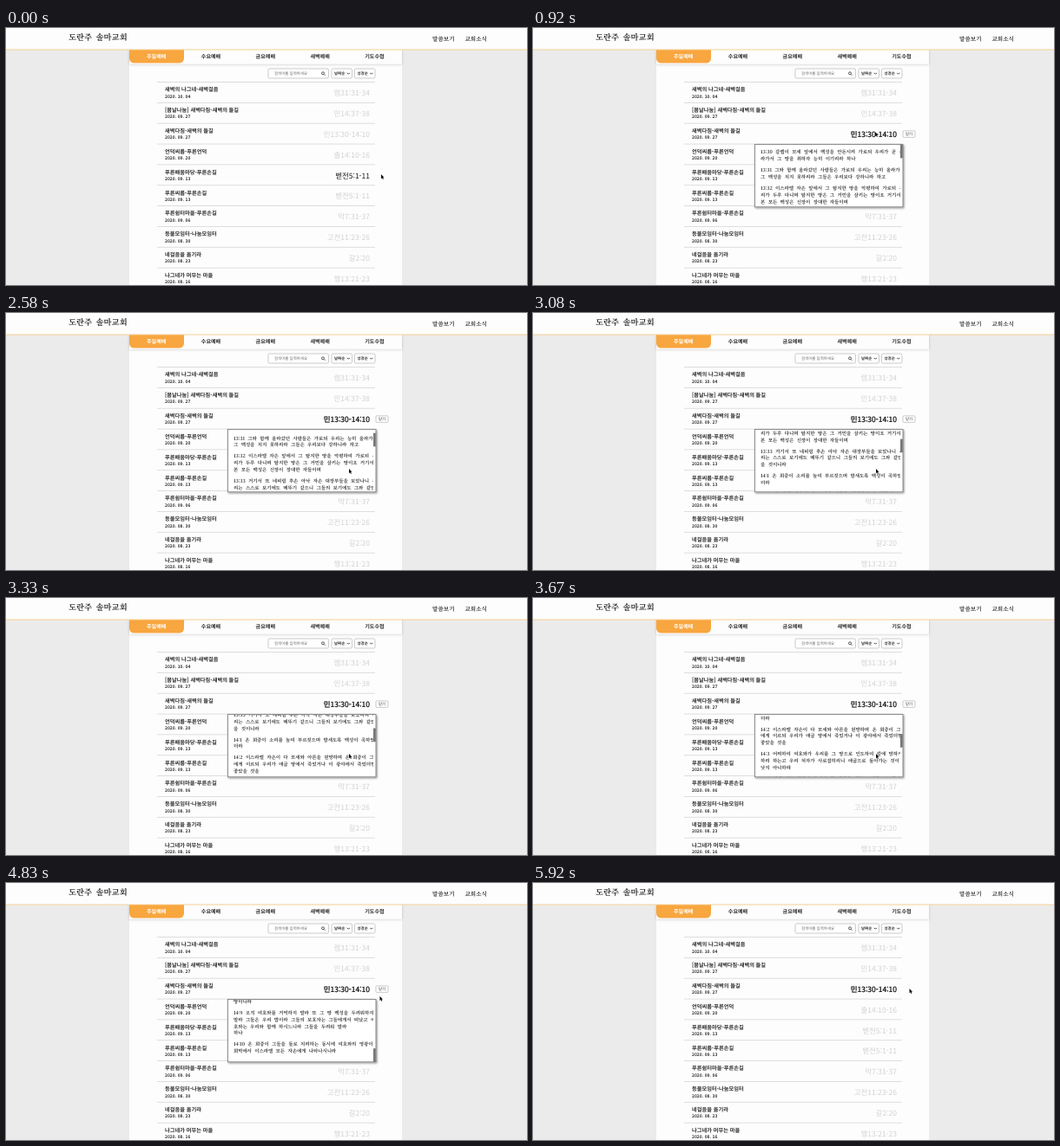
Write an HTML page that moves like this. It is 600 by 297 pixels and loops after 6010 ms.

```html
<!DOCTYPE html>
<html lang="ko">
<head>
<meta charset="utf-8">
<style>
  html, body { margin: 0; width: 100%; height: 100%; overflow: hidden; background: #ebebeb; }
  svg { display: block; width: 600px; height: 297px; }
  text { font-family: 'Noto Sans CJK KR', 'Noto Sans KR', sans-serif; fill: #2e2e2e; white-space: pre; text-rendering: geometricPrecision; }
  .brush { font-family: 'Noto Serif CJK KR', 'Noto Sans CJK KR', serif; font-weight: 600; }
  .mid { text-anchor: middle; }
  .tab { font-size: 6.1px; font-weight: 700; }
  .title { font-size: 6.24px; font-weight: 600; }
  .date { font-size: 4.95px; font-weight: 600; }
  .ref { font-size: 8.5px; font-weight: 500; text-anchor: end; }
  .small { font-size: 4.45px; font-weight: 500; }
  .verse { font-size: 5.55px; letter-spacing: -.15px; word-spacing: 1.9px; }
  .box { fill: #fff; stroke: #aaa; stroke-width: .6; }
  .icon { fill: none; stroke: #333; stroke-width: .8; }
</style>
</head>
<body>
<svg id="stage" viewBox="0 0 600 297"></svg>
<script>
const LOOP = 6010, FRAME = 1000 / 12;
const ROW_TOP = 62.5, ROW_STEP = 23.85, LINE = 7.8, GAP = 5.2;

const rows = [
  ['새벽의 나그네-새벽걸음', '2020. 10. 04', '렘31:31-34'],
  ['[봄날나눔] 새벽다짐-새벽의 들길', '2020. 09. 27', '민14:37-38'],
  ['새벽다짐-새벽의 들길', '2020. 09. 27', '민13:30-14:10'],
  ['언덕씨름-푸른언덕', '2020. 09. 20', '출14:10-16'],
  ['푸른배움마당-푸른손길', '2020. 09. 13', '벧전5:1-11'],
  ['푸른씨름-푸른손길', '2020. 09. 13', '벧전5:1-11'],
  ['푸른쉼터마을-푸른손길', '2020. 09. 06', '막7:31-37'],
  ['등불모임터-나눔모임터', '2020. 08. 30', '고전11:23-26'],
  ['네걸음을 옮기라', '2020. 08. 23', '갈2:20'],
  ['나그네가 머무는 마을', '2020. 08. 16', '행13:21-23']
];

const verses = [
  '13:30 갈렙이 모세 앞에서 백성을 안돈시켜 가로되 우리가 곧 올|라가서 그 땅을 취하자 능히 이기리라 하나',
  '13:31 그와 함께 올라갔던 사람들은 가로되 우리는 능히 올라가서|그 백성을 치지 못하리라 그들은 우리보다 강하니라 하고',
  '13:32 이스라엘 자손 앞에서 그 탐지한 땅을 악평하여 가로되 우|리가 두루 다니며 탐지한 땅은 그 거민을 삼키는 땅이요 거기서|본 모든 백성은 신장이 장대한 자들이며',
  '13:33 거기서 또 네피림 후손 아낙 자손 대장부들을 보았나니 우|리는 스스로 보기에도 메뚜기 같으니 그들의 보기에도 그와 같았|을 것이니라',
  '14:1 온 회중이 소리를 높여 부르짖으며 밤새도록 백성이 곡하였|더라',
  '14:2 이스라엘 자손이 다 모세와 아론을 원망하며 온 회중이 그들|에게 이르되 우리가 애굽 땅에서 죽었거나 이 광야에서 죽었더면|좋았을 것을',
  '14:3 어찌하여 여호와가 우리를 그 땅으로 인도하여 칼에 망하게|하려 하는고 우리 처자가 사로잡히리니 애굽으로 돌아가는 것이|낫지 아니하랴',
  '14:4 이에 서로 말하되 우리가 한 장관을 세우고 애굽으로 돌아|가자 하매',
  '14:5 모세와 아론이 이스라엘 자손의 온 회중 앞에서 엎드린지|라',
  '14:6 그 땅을 탐지한 자 중 눈의 아들 여호수아와 여분네의 아들|갈렙이 그 옷을 찢고',
  '14:7 이스라엘 자손의 온 회중에 일러 가로되 우리가 두루 다니며|탐지한 땅은 심히 아름다운 땅이라',
  '14:8 여호와께서 우리를 기뻐하시면 우리를 그 땅으로 인도하여|들이시고 그 땅을 우리에게 주시리라 이는 과연 젖과 꿀이 흐르는|땅이니라',
  '14:9 오직 여호와를 거역하지 말라 또 그 땅 백성을 두려워하지|말라 그들은 우리 밥이라 그들의 보호자는 그들에게서 떠났고 여|호와는 우리와 함께 하시느니라 그들을 두려워 말라|하나',
  '14:10 온 회중이 그들을 돌로 치려하는 동시에 여호와의 영광이|회막에서 이스라엘 모든 자손에게 나타나시니라'
];

// Keyframes: [time, value...]
const cursorKeys = [[0, 432, 169], [667, 394, 120], [1417, 394, 120], [1750, 395, 180],
  [4450, 395, 180], [4750, 430, 132], [5417, 433.5, 122]];
const scrollKeys = [[2083, 0], [2583, 19.5], [3083, 54], [3667, 111.4], [4250, 223.4], [4583, 282]];
const hoverKeys = {
  2: [[417, 0], [750, 1]],
  3: [[167, 0], [417, .7], [667, 0]],
  4: [[0, .86], [83, .86], [417, 0]]
};

function at(keys, t) {
  if (t <= keys[0][0]) return keys[0].slice(1);
  const i = keys.findIndex(k => k[0] > t);
  if (i < 0) return keys[keys.length - 1].slice(1);
  const a = keys[i - 1], b = keys[i], p = (t - a[0]) / (b[0] - a[0]);
  return a.slice(1).map((v, j) => v + (b[j + 1] - v) * p);
}

const text = (x, y, cls, s, extra = '') => `<text x="${x}" y="${y}" class="${cls}" ${extra}>${s}</text>`;
const rect = (x, y, w, h, extra) => `<rect x="${x}" y="${y}" width="${w}" height="${h}" ${extra}/>`;
const caret = x => `<path class="icon" d="M${x - 1.7} 52.1l1.7 .9l1.7-.9"/>`;

function page() {
  const tabs = ['주일예배', '수요예배', '금요예배', '새벽예배', '기도수첩'];
  return rect(142, 25, 314, 272, 'fill="#fdfdfd"') +
    rect(142, 25, 314, 16.5, 'fill="#fdfdfd" filter="url(#soft)"') +
    '<path d="M142 25h63v9.5q0 6-6 6h-51q-6 0-6-6z" fill="#f8a63f"/>' +
    tabs.map((s, i) => text(173.2 + i * 62.8, 34.6, 'tab mid', s, i ? '' : 'style="fill:#fff"')).join('') +
    rect(0, 0, 600, 25, 'fill="#fdfdfd"') +
    rect(0, 24.5, 600, 1, 'fill="#f9cf94"') +
    text(72, 14.3, 'brush', '도란주 솔마교회', 'font-size="9.4" word-spacing="1.4"') +
    text(503.8, 14.8, 'brush mid', '말씀보기', 'font-size="6.6"') +
    text(541.2, 14.8, 'brush mid', '교회소식', 'font-size="6.6"') +
    rect(302, 47, 69.5, 11, 'rx="1.5" class="box"') +
    text(309, 54.1, 'small', '검색어를 입력하세요', 'style="fill:#666"') +
    '<circle cx="365" cy="52.3" r="1.5" class="icon"/><path d="M366.1 53.4l1.4 1.4" class="icon"/>' +
    rect(375, 47, 23.5, 11, 'rx="1.5" class="box"') + text(378, 54.1, 'small', '날짜순', 'style="font-weight:700"') + caret(394.3) +
    rect(401.5, 47, 23.5, 11, 'rx="1.5" class="box"') + text(404.5, 54.1, 'small', '성경순', 'style="font-weight:700"') + caret(420.8);
}

function list() {
  return rows.map(([title, date, ref], i) => {
    const y = ROW_TOP + i * ROW_STEP;
    return rect(174, y - .4, 251, .8, 'fill="#d6d6d6"') +
      text(183, y + 10.8, 'title', title) +
      text(183, y + 18.1, 'date', date) +
      text(419, y + 15.6, 'ref', ref, `id="ref${i}"`);
  }).join('');
}

function popup() {
  let y = 145.4, lines = '';
  for (const v of verses) {
    for (const s of v.split('|')) {
      lines += text(262, y.toFixed(1), 'brush verse', s);
      y += LINE;
    }
    y += GAP;
  }
  return '<g id="popup">' +
    rect(426, 118.8, 14, 7.6, 'rx="1" class="box" id="close"') +
    text(433, 124.2, 'small mid', '닫기') +
    rect(255.5, 134.5, 170.5, 72.3, 'fill="#fff" stroke="#777" stroke-width=".8" filter="url(#drop)"') +
    `<g clip-path="url(#view)"><g id="verses">${lines}</g></g>` +
    rect(423, 134.8, 2.8, 15.6, 'fill="#777" id="thumb"') + '</g>';
}

stage.innerHTML = `<defs>
  <filter id="soft" x="-5%" y="-50%" width="110%" height="200%"><feDropShadow dx="0" dy=".6" stdDeviation="1.4" flood-opacity=".2"/></filter>
  <filter id="drop" x="-5%" y="-10%" width="110%" height="125%"><feDropShadow dx="1" dy="1.2" stdDeviation="1" flood-opacity=".45"/></filter>
  <clipPath id="view">${rect(256, 135, 167, 71.4, '')}</clipPath></defs>` +
  page() + list() + popup() +
  '<path id="cursor" d="M0 0V5.2L1.2 4.2L2 6L2.9 5.6L2.1 3.8H3.6Z" fill="#111" stroke="#fff" stroke-width=".4" paint-order="stroke"/>';

const el = id => document.getElementById(id);

function draw(now) {
  const step = Math.min(71, Math.floor((now % LOOP + 4) / FRAME));
  const t = step * FRAME + .5;

  rows.forEach((_, i) => {
    const h = hoverKeys[i] ? at(hoverKeys[i], t)[0] : 0;
    const c = Math.round(210 * (1 - h)), style = el('ref' + i).style;
    style.fill = style.stroke = `rgb(${c},${c},${c})`;
    style.strokeWidth = i === 2 ? .2 * h : 0;
  });

  const [scroll] = at(scrollKeys, t), [x, y] = at(cursorKeys, t);
  el('popup').style.display = t > 916 && t < 5916 ? '' : 'none';
  el('verses').setAttribute('transform', `translate(0 ${-scroll})`);
  el('thumb').setAttribute('y', 134.8 + scroll * .2);
  el('close').style.fill = t > 5500 && t < 5666 ? '#ddd' : t > 4916 ? '#f3f3f3' : '#fff';
  el('cursor').setAttribute('transform', `translate(${x} ${y})`);
  el('cursor').style.display = t > 4100 && t < 4450 ? 'none' : '';
}

const start = performance.now();
function tick() {
  draw(performance.now() - start);
  requestAnimationFrame(tick);
}
tick();
</script>
</body>
</html>
```
